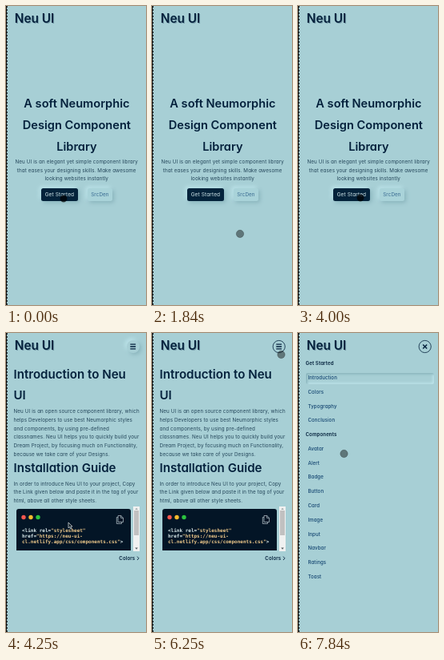
Recreate the animation shown at these times as an HTML page. Size 175 by 374 pixels, loop 8000 ms.

```html
<!DOCTYPE html>
<html lang="en">
<head>
<meta charset="utf-8">
<title>Neu UI</title>
<style>
  :root { --bg: #a7cfd5; --ink: #04213c; --lite: #c0e7ed; --dim: #88b3bb; }
  html, body { margin: 0; width: 100%; height: 100%; overflow: hidden; background: var(--bg); }
  #stage { position: absolute; left: 0; top: 0; width: 175px; height: 374px; overflow: hidden; background: var(--bg); }
  .layer, .layer > svg { position: absolute; left: 0; top: 0; width: 175px; height: 374px; }
  .box { position: absolute; box-sizing: border-box; }
  text { font-family: Inter, "Open Sans", sans-serif; font-size: 6.25px; letter-spacing: .12px;
    font-feature-settings: "cv11"; fill: #24465a; }
  .mid { text-anchor: middle; }
  .h, .brand { font-weight: 600; letter-spacing: 0; fill: var(--ink); }
  .h { font-size: 15.1px; }
  .mid .h { font-size: 14.6px; }
  .brand { font-size: 15.3px; filter: drop-shadow(1px 1px .5px rgba(50, 85, 110, .4)); }
  .b { font-size: 6.1px; font-weight: 600; fill: var(--ink); }
  .link { font-size: 6.05px; font-weight: 500; fill: #12436f; }
  .code text { font: bold 6px "DejaVu Sans Mono", monospace; letter-spacing: 0; fill: #dcebec; }
  .code .s { fill: #eec88a; }
  .raised { box-shadow: 2px 2px 5px var(--dim), -2px -2px 5px var(--lite); }
  #start { left: 43.5px; top: 228px; width: 46px; height: 15.5px; border-radius: 2.5px; background: #04233b; }
  #repo { left: 102px; top: 228px; width: 31px; height: 15.5px; border-radius: 2.5px; background: #a9d3d9; }
  #code { left: 13px; top: 220px; width: 143.3px; height: 51.7px; border-radius: 3px 3px 0 0; background: #031526; }
  #bar { left: 159px; top: 217px; width: 8px; height: 56px; background: #f0f1f1; }
  #thumb { left: 160px; top: 222px; width: 6px; height: 31px; background: #c1c1c1; }
  #menu { background: var(--bg); }
  #active { left: 9.5px; top: 50px; width: 160px; height: 13.5px; border-radius: 2px;
    box-shadow: inset 1.5px 1.5px 3px var(--dim), inset -1.5px -1.5px 3px var(--lite); }
  #burger { left: 150.7px; top: 9px; width: 16px; height: 16px; border-radius: 50%; background: var(--bg); }
  #strip { left: 0; top: 0; width: 2px; height: 374px;
    background: linear-gradient(90deg, #101416 1px, transparent 1px),
      repeating-linear-gradient(#30393c 0 2px, var(--bg) 2px 4px); }
  .line { fill: none; stroke: var(--ink); stroke-width: 1.3; }
</style>
</head>
<body>
<div id="stage">
  <div class="layer" id="home">
    <div class="box raised" id="start"></div>
    <div class="box raised" id="repo"></div>
    <svg viewBox="0 0 175 374">
      <g class="mid">
        <text class="h" x="88.4" y="127">A soft Neumorphic</text>
        <text class="h" x="88.4" y="154">Design Component</text>
        <text class="h" x="88.4" y="180.5">Library</text>
        <text x="88.2" y="197.3">Neu UI is an elegant yet simple component library</text>
        <text x="88.2" y="207.9">that eases your designing skills. Make awesome</text>
        <text x="88.2" y="218.4">looking websites instantly</text>
        <text x="66.9" y="238" style="font-size:6.5px;fill:#d3e8ec">Get Started</text>
        <text x="117.4" y="238" style="fill:#386a91">SrcDen</text>
      </g>
    </svg>
  </div>

  <div class="layer" id="docs">
    <div class="box" id="code"></div>
    <div class="box" id="bar"></div>
    <div class="box" id="thumb"></div>
    <svg viewBox="0 0 175 374">
      <text class="h" x="9.5" y="57">Introduction to Neu</text>
      <text class="h" x="9.5" y="83">UI</text>
      <g id="intro"></g>
      <text class="h" x="9.5" y="174.3">Installation Guide</text>
      <g id="guide"></g>
      <circle cx="22" cy="230.5" r="2.7" fill="#f4574f"/>
      <circle cx="31" cy="230.5" r="2.7" fill="#f8bb2e"/>
      <circle cx="40" cy="230.5" r="2.7" fill="#2bc440"/>
      <path d="M140 228.5h3.8l2.7 2.7v5.3h-6.500zM143.600 228.500v2.900h2.900M140 230.500h-1.700v8h6.200v-2" fill="none" stroke="#aab7be" stroke-width=".8"/>
      <g class="code">
        <text x="20" y="248.700">&lt;link rel=<tspan class="s">"stylesheet"</tspan></text>
        <text x="20" y="256">href=<tspan class="s">"https://neu-ui-</tspan></text>
        <text x="20" y="263.300"><tspan class="s">cl.netlify.app/css/components.css"</tspan>&gt;</text>
      </g>
      <path d="M161.300 268.500h3.600l-1.800 2.200z" fill="#555d60"/>
      <path d="M161.300 221h3.600l-1.800-2.200z" fill="#a5abac"/>
      <text class="b" x="141.300" y="284">Colors</text>
      <path class="line" d="M164 279.600l2 2.200-2 2.200" style="stroke-width:.9"/>
    </svg>
  </div>

  <div class="layer" id="menu">
    <div class="box" id="active"></div>
    <svg viewBox="0 0 175 374"><g id="items"></g></svg>
  </div>

  <div class="box" id="burger"></div>
  <div class="layer">
    <svg viewBox="0 0 175 374">
      <text class="brand" x="10.800" y="21.200">Neu UI</text>
      <circle id="ring" class="line" cx="158.700" cy="17" r="7.600" style="stroke-width:.8"/>
      <path id="bars" class="line" d="M155.300 14.200h6.800M155.300 17h6.800M155.300 19.800h6.800"/>
      <path id="cross" class="line" d="M156.200 14.500l5 5m0-5l-5 5" style="stroke-width:1.500"/>
      <circle id="touch" r="4.700" fill="#000" stroke="#000" stroke-opacity=".3" stroke-width=".8"/>
      <path id="arrow" d="M0 0v7l1.600-1.400 1.100 2.500 1.200-.5-1.100-2.500h2.200z" fill="#17232b" stroke="#dfe5e7" stroke-width=".7"/>
    </svg>
  </div>
  <div class="box" id="strip"></div>
</div>

<script>
const LOOP = 8000, STEP = 1000 / 12;
const $ = id => document.getElementById(id);

function addText(parent, str, x, y, cls = '') {
  const el = document.createElementNS('http://www.w3.org/2000/svg', 'text');
  el.setAttribute('x', x);
  el.setAttribute('y', y);
  el.setAttribute('class', cls);
  el.textContent = str;
  parent.append(el);
}

const addLines = (id, y, lines) =>
  lines.forEach((str, i) => addText($(id), str, 9.5, y + i * 10.65));

addLines('intro', 100.4, [
  'Neu UI is an open source component library, which',
  'helps Developers to use best Neumorphic styles',
  'and components, by using pre-defined',
  'classnames. Neu UI helps you to quickly build your',
  'Dream Project, by focusing much on Functionality,',
  'because we take care of your Designs.'
]);
addLines('guide', 190.8, [
  'In order to introduce Neu UI to your project, Copy',
  'the Link given below and paste it in the tag of your',
  'html, above all other style sheets.'
]);

const groups = {
  'Get Started': 'Introduction Colors Typography Conclusion',
  'Components': 'Avatar Alert Badge Button Card Image Input Navbar Ratings Toast'
};
let row = 0;
const addRow = (str, x, cls) => addText($('items'), str, x, 40.2 + 17.78 * row++, cls);
for (const [head, list] of Object.entries(groups)) {
  addRow(head, 9.5, 'b');
  list.split(' ').forEach(name => addRow(name, 12.5, 'link'));
}

// Pointer path: time, x, y
const path = [
  [0, 72, 241], [667, 72, 241], [1167, 111, 299], [1333, 113, 297],
  [1667, 112, 288], [1833, 110, 285], [2583, 84, 249], [2667, 84, 245],
  [2750, 84, 245], [3000, 78, 240], [4166, 78, 240], [5083, 77, 238],
  [5500, 169, 24], [5667, 161.5, 27], [7166, 161.5, 27],
  [7583, 43, 162], [7833, 57.5, 151], [LOOP, 57.5, 151]
];

const ease = p => p * p * (3 - 2 * p);

function pointer(t) {
  const i = Math.max(1, path.findIndex(k => k[0] >= t));
  const [t0, x0, y0] = path[i - 1], [t1, x1, y1] = path[i];
  const p = ease((t - t0) / (t1 - t0));
  return [x0 + (x1 - x0) * p, y0 + (y1 - y0) * p];
}

const show = (id, on) => { $(id).style.visibility = on ? 'visible' : 'hidden'; };
const between = (t, a, b) => t >= a && t < b;

function draw(now) {
  const t = Math.floor((now % LOOP + 1) / STEP) * STEP;
  const onDocs = t >= 4160, focused = t >= 6160, open = t >= 6300;
  const slide = ease(Math.min(1, Math.max(0, (t - 6250) / 333)));
  const [x, y] = pointer(t);
  const isArrow = between(t, 4160, 5100);
  const pressed = t < 700 || between(t, 2900, 4160);

  show('home', !onDocs);
  show('docs', onDocs && slide < 1);
  show('menu', open);
  $('menu').style.transform = `translateX(${(slide - 1) * 175}px)`;

  show('burger', onDocs);
  $('burger').classList.toggle('raised', !focused);
  show('ring', focused);
  show('bars', onDocs && !open);
  show('cross', open);

  show('touch', !isArrow);
  show('arrow', isArrow);
  $('touch').setAttribute('transform', `translate(${x} ${y})`);
  $('touch').setAttribute('fill-opacity', pressed ? 0.7 : 0.43);
  $('touch').setAttribute('r', pressed ? 4.2 : 4.7);
  $('arrow').setAttribute('transform', `translate(${x} ${y - 3})`);
}

function tick() {
  draw(performance.now());
  requestAnimationFrame(tick);
}
tick();
</script>
</body>
</html>
```
